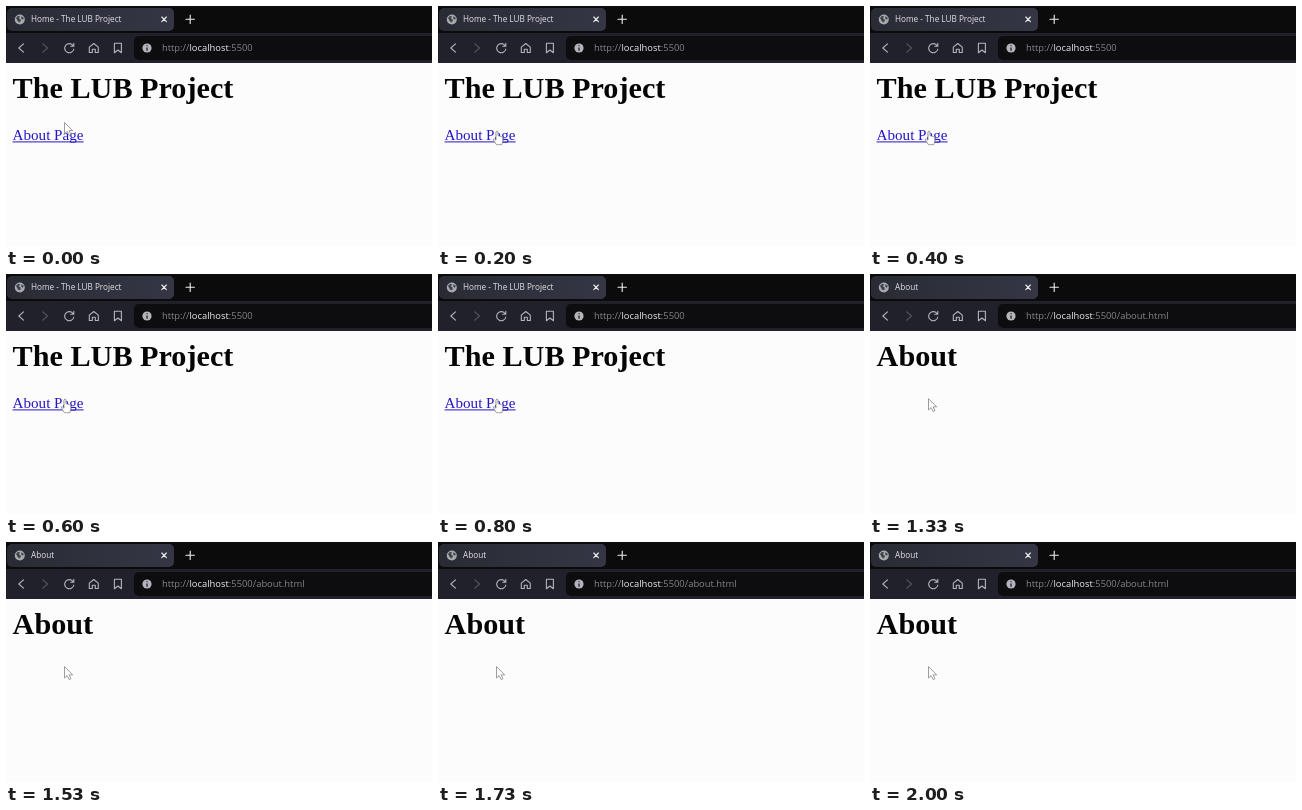
These frames come from a looping animation (426 by 240 pixels, 2070 ms). An HTML page:

```html
<!DOCTYPE html>
<html lang="en">
<head>
<meta charset="utf-8">
<title>Page navigation</title>
<style>
  html, body { margin: 0; width: 100%; height: 100%; overflow: hidden; background: #fcfcfd; }
  svg { display: block; width: 426px; height: 240px; }
  .ui { font-family: "Open Sans", "Noto Sans", sans-serif; }
  .page { font-family: "Liberation Serif", "Times New Roman", serif; }
  .icon { fill: none; stroke: #b4b5ba; stroke-width: 1.1; stroke-linecap: round; stroke-linejoin: round; }
  .cursor { fill: #fff; stroke: #85858a; stroke-width: .8; stroke-linejoin: round; }
</style>
</head>
<body>
<svg viewBox="0 0 426 240">
  <defs>
    <linearGradient id="tabFill">
      <stop offset="0" stop-color="#292b34"/>
      <stop offset="1" stop-color="#343645"/>
    </linearGradient>
  </defs>
  <rect width="426" height="240" fill="#fcfcfd"/>

  <!-- Tab strip -->
  <rect width="426" height="57" fill="#0b0b0c"/>
  <rect x="1" y="2" width="167" height="23" rx="5" fill="url(#tabFill)"/>
  <g id="favicon">
    <circle cx="13.8" cy="13.5" r="5" fill="#a9abb0"/>
    <path d="M10 12l2-2.2 2 .8-1 2 2 1.2-1 2.6-2-1zM15.3 10.2l2.4 1.6-.6 2-1.8-1z" fill="#41434d"/>
  </g>
  <text id="title" class="ui" x="25" y="16.3" font-size="8.2" fill="#e4e4e8"></text>
  <path class="icon" style="stroke:#f0f0f2" d="M155.8 11l4.6 4.6m0-4.6l-4.6 4.6M180 13.3h8.4m-4.2-4.2v8.4"/>

  <!-- Toolbar -->
  <rect y="27" width="426" height="30" fill="#20212a"/>
  <rect x="128" y="30" width="310" height="24" rx="5" fill="#0d0d0f"/>
  <g class="icon">
    <path d="M17.5 37.8L12.8 42l4.7 4.2"/>
    <path d="M36.8 37.8L41.5 42l-4.7 4.2" stroke="#54555e"/>
    <path id="reload" d="M67.2 39.8A4.6 4.6 0 1 0 67.8 43M67.8 37.3v3h-3"/>
    <path id="stop" d="M59.5 38.3l7.4 7.4m0-7.4l-7.4 7.4"/>
    <path d="M83.3 41.2l4.5-3.7 4.5 3.7v5.3h-3v-3.3h-3v3.3h-3z"/>
    <path d="M108.4 37.3h7v9.4l-3.5-2.7-3.5 2.7z"/>
  </g>
  <circle cx="141" cy="42" r="4.6" fill="#b4b5ba"/>
  <path d="M141 39.2v1.1m0 1.3v3.2" stroke="#17171a" stroke-width="1.2"/>
  <text class="ui" x="156" y="45.4" font-size="9.4" fill="#85868b">http://<tspan fill="#eeeef0">localhost</tspan>:5500<tspan id="path"></tspan></text>

  <!-- Page -->
  <text id="heading" class="page" x="6.6" y="92" font-size="30.2" font-weight="bold" fill="#050505"></text>
  <g id="link" fill="#2417c4">
    <text class="page" x="6.6" y="134" font-size="15.1">About Page</text>
    <rect x="6.6" y="135.4" width="71" height="1"/>
  </g>

  <path id="arrow" class="cursor" d="M0 0V11.3L2.7 8.9 4.6 12.8 6.5 12 4.7 8.1H8.2Z"/>
  <path id="hand" class="cursor" d="M0 1Q1 -.3 2 1V5.2Q3.2 4.6 3.8 5.6 5 5.1 5.4 6.2 6.7 5.9 6.8 7.2V10.3L5.8 14H.4L-2.6 9.4Q-3 7.8 -1.6 8.2L0 9.6Z"/>
</svg>
<script>
const LOOP = 2070, OVER = 130, LOADING = 930, LOADED = 1130;
const el = id => document.getElementById(id);
const show = (id, on) => el(id).style.display = on ? "" : "none";
const setText = (id, text) => { if (el(id).textContent !== text) el(id).textContent = text; };

function draw(t) {
  const about = t >= LOADED;
  const loading = t >= LOADING && !about;
  const hand = t >= OVER && !about;
  const name = about ? "About" : "The LUB Project";

  setText("title", about ? name : "Home - " + name);
  setText("heading", name);
  setText("path", about ? "/about.html" : "");
  show("link", !about);
  show("favicon", !loading);
  show("reload", !loading);
  show("stop", loading);
  show("arrow", !hand);
  show("hand", hand);

  const y = t < 70 ? 116.5 : t < OVER ? 120 : 124.7;
  el("arrow").setAttribute("transform", `translate(58.5 ${y})`);
  el("hand").setAttribute("transform", `translate(58 ${y})`);
}

function tick() {
  draw(performance.now() % LOOP);
  requestAnimationFrame(tick);
}
tick();
</script>
</body>
</html>
```
